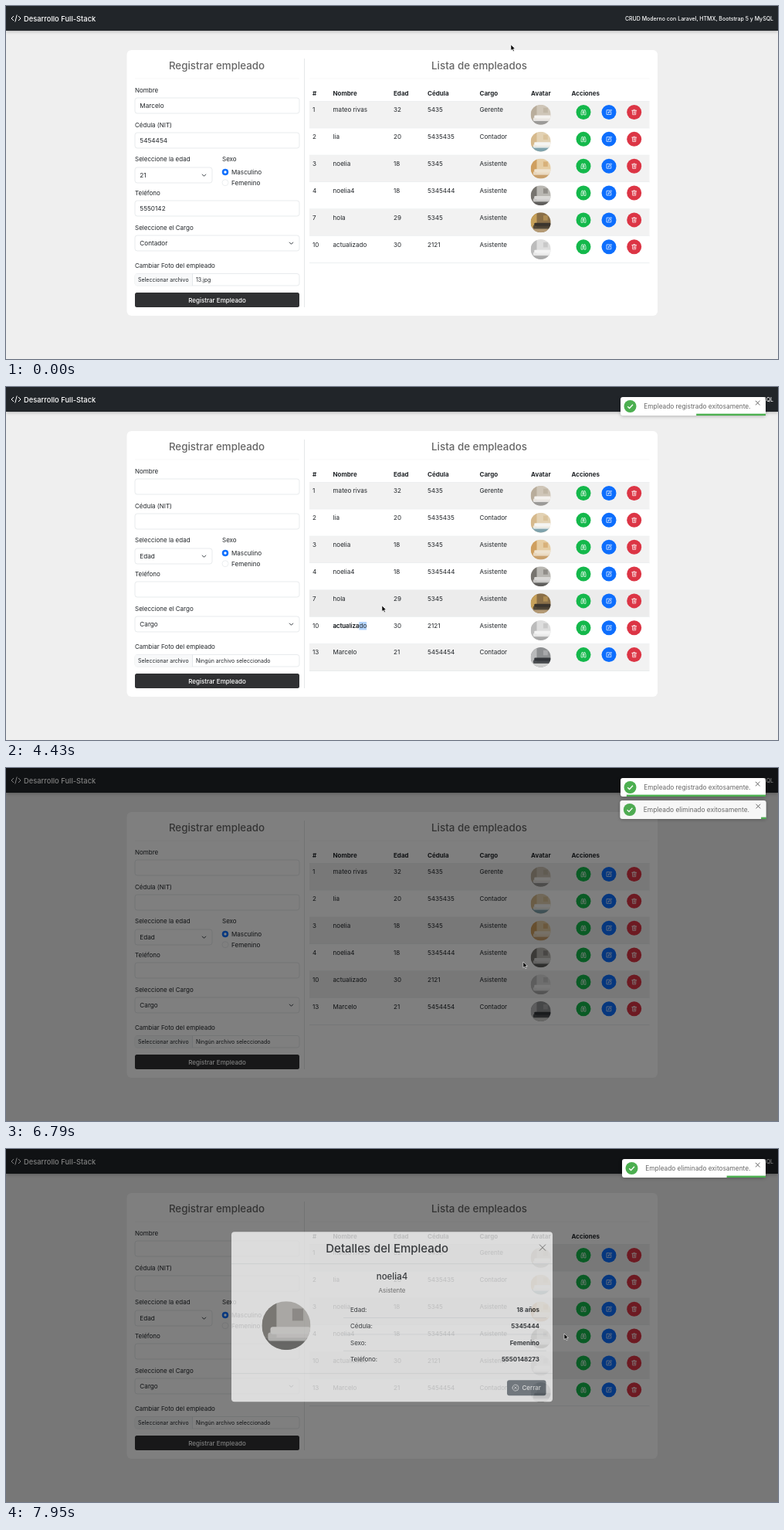
An HTML page that plays this animation: 1000x457 px, repeating every 8000 ms.

```html
<!DOCTYPE html>
<html lang="es">
<head>
<meta charset="utf-8">
<title>Registro de empleados</title>
<style>
html, body { margin: 0; width: 100%; height: 100%; overflow: hidden; background: #efefef; }
svg { display: block; width: 100vw; height: 100vh; font-family: Inter, Roboto, "Liberation Sans", sans-serif; }
text { white-space: pre; }
.icon { fill: none; stroke: #fff; stroke-width: .7; stroke-linecap: round; stroke-linejoin: round; }
.shadow { filter: drop-shadow(0 1px 2px rgba(0, 0, 0, .25)); }
</style>
</head>
<body>
<svg id="stage" viewBox="0 0 1000 457"></svg>
<script>
const LOOP = 8000, SUBMITTED = 2010, SAVED = 2105, ASK = 5540, REMOVED = 6620, DETAILS = 7690;
const LEAVE = 6985, LEAVE_TIME = 370, BAR_TIME = 4909;
const ROW_TOP = 123.5, ROW_H = 34.85;
const INK = '#212529', LINE = '#dee2e6', GREEN = '#4caf50', RED = '#dc3545', GRAY = '#6c757d';

// Markup helpers
const text = (x, y, s, size = 8, more = '') =>
  `<text x="${x}" y="${y}" font-size="${size}" fill="${INK}" ${more}>${s}</text>`;
const box = (x, y, w, h, fill, more = '') =>
  `<rect x="${x}" y="${y}" width="${w}" height="${h}" fill="${fill}" ${more}/>`;
const path = (d, more = 'class="icon"') => `<path d="${d}" ${more}/>`;
const at = (x, y, inner, scale = 1) => `<g transform="translate(${x} ${y}) scale(${scale})">${inner}</g>`;
const group = (id, inner, more = '') => `<g id="${id}" ${more}>${inner}</g>`;
const hline = (x1, x2, y, color = LINE) =>
  path(`M${x1} ${y}H${x2}`, `stroke="${color}" stroke-width=".6"`);
const field = (y, w = 213, h = 20) =>
  box(167, y, w, h, '#fff', `rx="3" stroke="${LINE}" stroke-width=".7"`);
const chevron = (x, y) => path(`M${x - 2.5} ${y - 1.2}L${x} ${y + 1.3}L${x + 2.5} ${y - 1.2}`,
  'fill="none" stroke="#343a40" stroke-width="1"');
const cross = (x, y, r, color) =>
  path(`M${x - r} ${y - r}l${2 * r} ${2 * r}M${x + r} ${y - r}l${-2 * r} ${2 * r}`, `stroke="${color}" stroke-width=".9"`);

const ICONS = {
  look: 'M-3 3V0L-2-3H-.8V3ZM.8 3V-3H2L3 0V3ZM-.8 0H.8',
  edit: 'M1-2.8H-3V3H2.8V-.4M-.8.9L-.4-.6L2.8-3.4L3.6-2.6L.6.5Z',
  trash: 'M-3-2.2H3M-1-2.2V-3.2H1V-2.2M-2.3-2.2L-2 3.2H2L2.3-2.2M-.7-.8V1.8M.7-.8V1.8',
  close: 'M-4 0A4 4 0 1 1 4 0A4 4 0 1 1-4 0M-1.5-1.5L1.5 1.5M1.5-1.5L-1.5 1.5'
};

// Unit-radius room picture: wall, side panel, furniture, floor
const room = ([wall, side, sofa, floor]) => `<g clip-path="url(#round)">
  ${box(-1, -1, 2, 2, wall)}${box(-1, -1, .6, 1.5, side)}${box(.25, -.7, .45, .5, side, 'opacity=".6"')}
  ${box(-1, .5, 2, .5, floor)}${box(-.65, .05, 1.65, .3, sofa, 'rx=".1"')}${box(-.75, .28, 1.7, .35, sofa, 'rx=".1" opacity=".8"')}</g>`;

const people = [
  ['1', 'mateo rivas', '32', '5435', 'Gerente', ['#cfc6b8', '#b9ad9b', '#f4f2ef', '#9b9a98']],
  ['2', 'lia', '20', '5435435', 'Contador', ['#e3d2b4', '#d6b98c', '#f5f5f3', '#7fa3ad']],
  ['3', 'noelia', '18', '5345', 'Asistente', ['#e6cda3', '#cf9f5f', '#efe3d0', '#c9a06c']],
  ['4', 'noelia4', '18', '5345444', 'Asistente', ['#b9b7b2', '#77746f', '#dad9d7', '#5f5e5c']],
  ['7', 'hola', '29', '5345', 'Asistente', ['#8a6f48', '#c7a15a', '#3b352e', '#b49a75']],
  ['10', 'actualizado', '30', '2121', 'Asistente', ['#dedede', '#bcbcbc', '#f3f3f3', '#a9a9a9']],
  ['13', 'Marcelo', '21', '5454454', 'Contador', ['#8d8f91', '#b9babb', '#33363a', '#cfcfce']]
];
const columns = [397, 423.5, 502, 546, 613.5];
const actions = [[748, '#14b84b', 'look'], [781, '#0d6efd', 'edit'], [813.7, RED, 'trash']];

const row = (p, i) => group('row' + i,
  box(393, 0, 440.5, ROW_H, '#fff', `id="fill${i}"`) + hline(393, 833.5, ROW_H) +
  columns.map((x, c) => text(x, 13.9, p[c], 8.1)).join('') +
  at(692.7, 17.3, room(p[5]), 13) +
  actions.map(([x, color, icon]) =>
    at(x, 14, `<circle r="9.5" fill="${color}"/>` + path(ICONS[icon]))).join(''));

const radio = (y, label, on) =>
  `<circle cx="284" cy="${y}" r="4" fill="${on ? '#0d6efd' : '#fff'}" stroke="${on ? '#0d6efd' : LINE}" stroke-width=".6"/>
  <circle cx="284" cy="${y}" r="1.7" fill="#fff"/>` + text(292, y + 3, label, 8.1);

const values = (id, list, file) => group(id,
  [[132, 0], [177, 1], [221.7, 2], [265.2, 3], [310, 4]].map(([y, i]) => text(173.3, y, list[i], 8.2)).join('') +
  text(246, 357, file, 7.05));

const nav = `<defs><clipPath id="round"><circle r="1"/></clipPath></defs>` +
  box(0, 0, 1000, 457, '#efefef') +
  box(0, 0, 1000, 32, INK, 'class="shadow"') +
  path('M10 13L7 16L10 19M16 13L19 16L16 19M14.2 11.5L11.8 20.5', 'fill="none" stroke="#fff" stroke-width="1"') +
  text(23, 19.6, 'Desarrollo Full-Stack', 9.35, 'style="fill:#fff" font-weight="500"') +
  text(994, 18.8, 'CRUD Moderno con Laravel, HTMX, Bootstrap 5 y MySQL', 7, 'style="fill:#fff" font-weight="500" text-anchor="end"');

const heading = (x, s) => text(x, 81.6, s, 13.35, 'style="fill:#666" font-weight="500" text-anchor="middle"');

const form = heading(273, 'Registrar empleado') + hline(167, 380, 94, '#f3f3f3') +
  text(167, 112, 'Nombre') + field(119) +
  text(167, 156.7, 'Cédula (NIT)') + field(164) +
  text(167, 201.4, 'Seleccione la edad') + field(209, 100) + chevron(256.5, 219) +
  text(280, 201.4, 'Sexo') + radio(215, 'Masculino', true) + radio(228.7, 'Femenino', false) +
  text(167, 245.3, 'Teléfono') + field(252) +
  text(167, 290, 'Seleccione el Cargo') + field(297) + chevron(369.5, 307) +
  text(167, 339, 'Cambiar Foto del empleado') + field(346.5, 213, 15.5) +
  box(167.3, 346.8, 74, 15, '#f8f9fa') + path('M241.5 346.5v15.5', `stroke="${LINE}" stroke-width=".8"`) +
  text(171, 357, 'Seleccionar archivo', 7.05) +
  values('filled', ['Marcelo', '5454454', '21', '5550142', 'Contador'], '13.jpg') +
  values('blank', ['', '', 'Edad', '', 'Cargo'], 'Ningún archivo seleccionado') +
  box(167, 371, 213, 19, '#303133', 'rx="2.5" id="send"') +
  text(273.5, 383.5, 'Registrar Empleado', 8, 'id="sendText" style="fill:#fff" font-weight="500" text-anchor="middle"') +
  group('spinner', path('M3.3 0A3.3 3.3 0 1 1 0-3.3', 'fill="none" stroke="#fff" stroke-width="1.3"'));

const table = heading(613, 'Lista de empleados') + hline(393, 833.5, 94, '#f3f3f3') +
  [...columns, 680, 732.5].map((x, i) =>
    text(x, 116, ['#', 'Nombre', 'Edad', 'Cédula', 'Cargo', 'Avatar', 'Acciones'][i], 8, 'font-weight="700"')).join('') +
  hline(393, 833.5, ROW_TOP) + people.map(row).join('');

const selection = group('selection', box(457.3, 304, 9.8, 10.5, '#b3d4fc') + text(423.5, 311.7, 'actualizado', 8.1));

const button = (x, y, w, color, icon, label) =>
  box(x, y, w, 20, color, 'rx="3"') + at(x + 11, y + 10, path(ICONS[icon])) +
  text(x + 19.5, y + 13, label, 8, 'style="fill:#fff" font-weight="500"');

const confirmBox = group('confirm',
  box(370.5, 174, 259.5, 109.5, '#fff', 'rx="4"') +
  path('M384 185.5L388.7 193.7H379.3ZM384 188.3v2.6M384 192.2v.3', 'fill="none" stroke="#ffc107" stroke-width="1" stroke-linejoin="round"') +
  text(396, 193.4, 'Confirmar Eliminación', 9.55, 'font-weight="500"') + cross(617, 190, 3.8, '#777') +
  hline(370.5, 630, 206.5) +
  text(378.7, 224.3, '¿Está seguro que desea eliminar al empleado <tspan font-weight="700">hola</tspan>?', 7.95) +
  text(378.7, 235.5, 'Esta acción no se puede deshacer.', 7, 'style="fill:#6b6f73"') +
  button(501.5, 255.5, 60, GRAY, 'close', 'Cancelar') +
  button(565.5, 255.5, 55.5, RED, 'trash', 'Eliminar'));

const facts = [['Edad:', '18 años'], ['Cédula:', '5345444'], ['Sexo:', 'Femenino'], ['Teléfono:', '5550148273']];
const detailBox = group('details',
  box(292, 118.5, 416, 220, '#fff', 'rx="4"') +
  text(493.7, 145, 'Detalles del Empleado', 15, 'font-weight="500" text-anchor="middle"') +
  cross(695, 139, 4, '#666') + hline(292, 708, 160) +
  text(500, 180.2, 'noelia4', 11.5, 'font-weight="500" text-anchor="middle"') +
  text(500, 197.2, 'Asistente', 8, 'style="fill:#666" text-anchor="middle"') +
  at(363, 240, room(people[3][5]), 31.5) +
  facts.map(([k, v], i) => {
    const y = 222.3 + i * 21.4;
    return text(446, y, k) + text(691, y, v, 8, 'font-weight="700" text-anchor="end"') +
      (i < 3 ? hline(437, 700, y + 7.6) : '');
  }).join('') +
  hline(292, 708, 302) + button(649, 310.5, 50.5, GRAY, 'close', 'Cerrar'));

const toast = (id, word) => group(id,
  box(796, 13, 188, 24, '#fff', `rx="3" class="shadow" id="${id}Box"`) +
  group(id + 'Body',
    group(id + 'Icon', `<circle cx="808.5" cy="25" r="8" fill="${GREEN}"/>` +
      path('M805.2 25.2L807.6 27.5L812 22.8', 'fill="none" stroke="#fff" stroke-width="1.3"')) +
    text(826.3, 28, `Empleado ${word} exitosamente.`, 8.3, 'style="fill:#666"')) +
  cross(973.7, 20.6, 2.8, '#555') + box(0, 34.6, 0, 2.4, GREEN, `id="${id}Bar"`));

const cursor = group('cursor',
  path('M0 0V7.6L1.8 6L3 8.8L4.3 8.2L3.1 5.5H5.5Z', 'id="arrow" fill="#000" stroke="#fff" stroke-width=".6"') +
  path('M0 .6Q.9-.3 1.8.6V3.2Q3.2 2.6 3.6 3.5Q5 3 5.3 4Q6.7 3.8 6.6 5.2V7Q6.2 9 5 9.4H1.6Q.4 8.4-1.6 5.6Q-1.4 4.6-.2 5.2Z',
    'id="hand" fill="#fff" stroke="#111" stroke-width=".8"'));

document.getElementById('stage').innerHTML = nav +
  box(156.5, 57, 687.5, 344, '#fff', 'rx="6"') +
  path('M386.5 68V390', 'stroke="#dfe1e3" stroke-width=".8"') +
  form + table + selection +
  box(0, 0, 1000, 457, '#000', 'id="shade"') + confirmBox + detailBox +
  toast('saved', 'registrado') + toast('removed', 'eliminado') + cursor;

const el = {};
document.querySelectorAll('[id]').forEach(n => el[n.id] = n);

// Motion helpers
const clamp = v => Math.max(0, Math.min(1, v));
const ramp = (t, start, time) => clamp((t - start) / time);
const smooth = u => u * u * (3 - 2 * u);
const show = (node, on) => node.setAttribute('display', on ? 'inline' : 'none');
const set = (node, attrs) => { for (const k in attrs) node.setAttribute(k, attrs[k]); };

const easeOut = x => {
  let lo = 0, hi = 1;
  for (let i = 0; i < 20; i++) {
    const u = (lo + hi) / 2;
    if (1.74 * u * u - .74 * u * u * u < x) lo = u; else hi = u;
  }
  return smooth(lo);
};

function track(keys, u, ease = smooth) {
  const i = keys.findIndex(k => k[0] > u);
  if (i < 0) return keys[keys.length - 1].slice(1);
  if (i === 0) return keys[0].slice(1);
  const a = keys[i - 1], b = keys[i], f = ease((u - a[0]) / (b[0] - a[0]));
  return a.slice(1).map((v, j) => v + (b[j + 1] - v) * f);
}

// time, x, y
const route = [[120, 654, 50], [1500, 256, 379], [2120, 256, 379], [2790, 423, 347], [3550, 457, 309],
  [3950, 469, 308], [4430, 487, 283], [5380, 812, 275], [5580, 812, 275], [5980, 601, 263],
  [6400, 601, 263], [7160, 733, 240], [7330, 747, 241], [7500, 747, 241], [7920, 723, 239]];
// progress, scale, opacity
const bounceIn = [[0, .3, 0], [.5, 1.05, 1], [.7, .95, 1], [1, 1, 1]];
const bounceOut = [[0, 1, 1], [.2, .92, 1], [.46, 1.08, 1], [.6, 1.1, 1], [1, .3, 0]];

function drawModal(node, t, start, end) {
  show(node, t >= start && t < end + 300);
  const opening = t < end;
  const slide = opening ? 1 - easeOut(ramp(t, start, 300)) : easeOut(ramp(t, end, 300));
  set(node, {
    opacity: opening ? ramp(t, start, 150) : 1 - ramp(t, end, 150),
    transform: `translate(0 ${-24 * slide})`
  });
}

function drawToast(id, t, start, left, dy, leaving) {
  const age = t - start;
  show(el[id], age >= 0 && leaving < 1);
  const [scale, opacity] = leaving > 0 ? track(bounceOut, leaving) : track(bounceIn, clamp(age / 400));
  const lift = leaving > 0 ? -2 * clamp(leaving / .4) : 0;
  set(el[id], { opacity, transform: `translate(890 ${25 + dy + lift}) scale(${scale}) translate(-890 -25)` });
  set(el[id + 'Box'], { x: left, width: 984 - left });
  set(el[id + 'Body'], { transform: `translate(${left - 796} 0)` });
  const w = leaving > 0 ? 0 : (984 - left) * clamp(age / BAR_TIME);
  set(el[id + 'Bar'], { x: 984 - w, width: w });
}

function draw(t) {
  const [x, y] = track(route, t);
  const hideAsk = REMOVED + 300;
  const shade = t < REMOVED ? ramp(t, ASK, 150) : t < DETAILS ? 1 - ramp(t, hideAsk, 150) : ramp(t, DETAILS, 150);

  const sending = t >= SUBMITTED && t < SAVED;
  show(el.filled, t < SAVED);
  show(el.blank, t >= SAVED);
  show(el.spinner, sending);
  set(el.spinner, { transform: `translate(233 380.5) rotate(${(t - SUBMITTED) * .48 + 35})` });
  set(el.send, { fill: sending ? '#5e5e5f' : '#303133' });
  set(el.sendText, { x: sending ? 280.7 : 273.5 });

  const visible = people.map((p, i) => i).filter(i => i === 6 ? t >= SAVED : i === 4 ? t < REMOVED : true);
  const hovered = shade === 0 && x > 393 && x < 833 ? Math.floor((y - ROW_TOP) / ROW_H) : -1;
  people.forEach((p, i) => {
    const n = visible.indexOf(i);
    show(el['row' + i], n >= 0);
    set(el['row' + i], { transform: `translate(0 ${ROW_TOP + n * ROW_H})` });
    set(el['fill' + i], { fill: n === hovered ? '#ececec' : n % 2 ? '#fff' : '#f2f2f2' });
  });
  show(el.selection, t >= 3800 && t < REMOVED);

  set(el.shade, { opacity: shade * .5 });
  drawModal(el.confirm, t, ASK + 150, REMOVED);
  drawModal(el.details, t, DETAILS + 152, LOOP);

  const leaving = ramp(t, LEAVE, LEAVE_TIME), alone = leaving === 1;
  drawToast('saved', t, SAVED - 20, 796, 0, leaving);
  drawToast('removed', t, REMOVED, alone ? 798 : 796, alone ? 0 : 29, 0);
  set(el.savedIcon, { opacity: .75 + .25 * ramp(t, 2800, 100) });

  const onSend = x > 167 && x < 380 && y > 371 && y < 390;
  const onAction = shade === 0 && hovered >= 0 && hovered < visible.length &&
    actions.some(a => Math.hypot(x - a[0], y - ROW_TOP - hovered * ROW_H - 14) < 9.5);
  const onDelete = t > ASK && t < REMOVED && x > 565 && x < 621 && y > 255 && y < 276;
  const pointing = onSend || onAction || onDelete;
  show(el.hand, pointing);
  show(el.arrow, !pointing);
  set(el.cursor, { transform: `translate(${x} ${y})` });
}

const begin = performance.now();
function tick() {
  draw((performance.now() - begin) % LOOP);
  requestAnimationFrame(tick);
}
tick();
</script>
</body>
</html>
```
